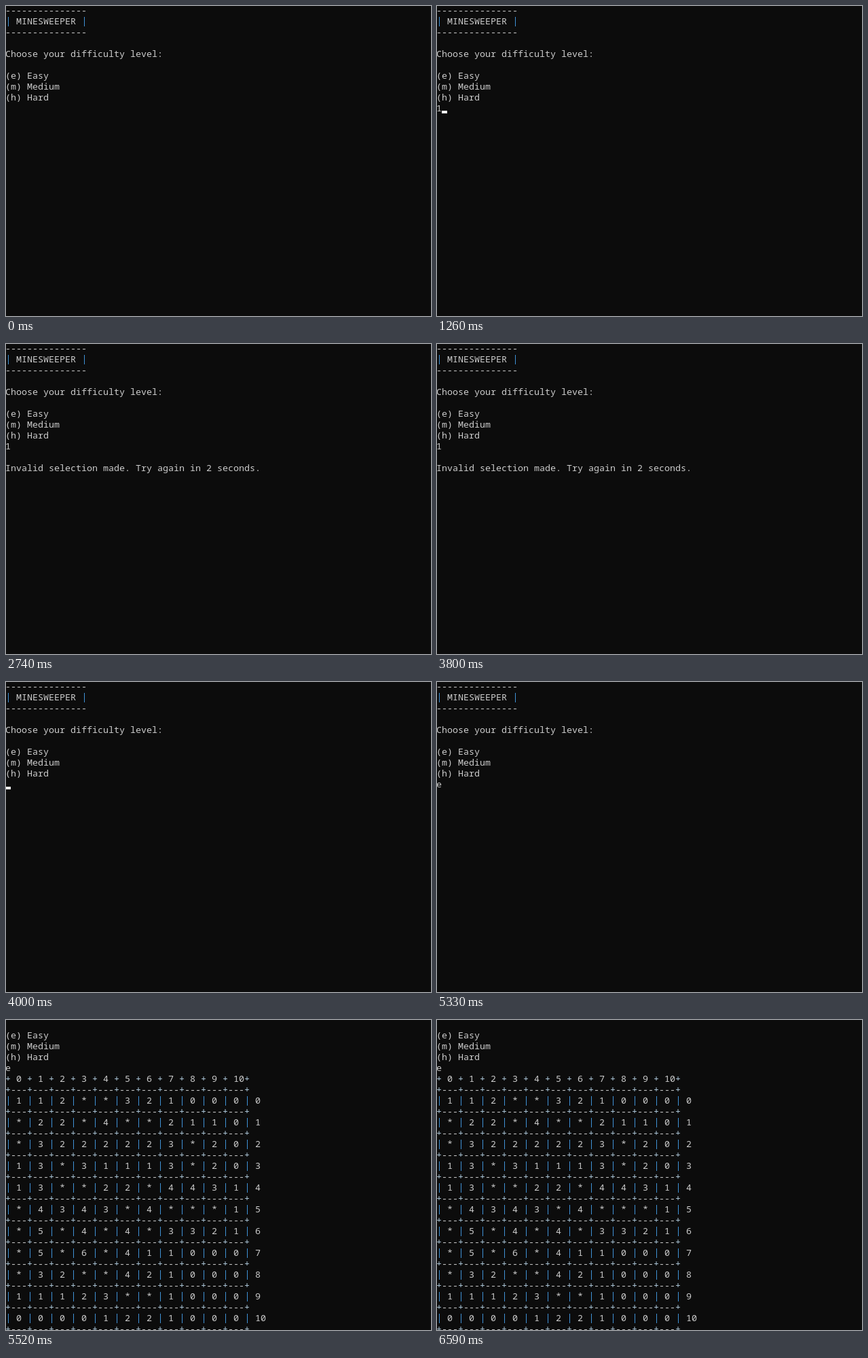
Animation of 626x456 px, one loop 7190 ms. Source, as an HTML page with a canvas:

```html
<!DOCTYPE html>
<html lang="en">
<head>
<meta charset="utf-8">
<title>Minesweeper console</title>
<style>
  html, body { margin: 0; height: 100%; overflow: hidden; background: #0c0c0c; }
  canvas { display: block; }
</style>
</head>
<body>
<canvas id="screen" width="626" height="456"></canvas>
<script>
const ctx = document.getElementById('screen').getContext('2d');
const LOOP = 7190, CELL_W = 8, CELL_H = 16;

const levels = ['(e) Easy', '(m) Medium', '(h) Hard'];
const rule = '-'.repeat(15);
const menu = [rule, '| MINESWEEPER |', rule, '', 'Choose your difficulty level:', '', ...levels];
const failed = [...menu, '1', '', 'Invalid selection made. Try again in 2 seconds.'];
const chosen = ['', ...levels, 'e'];

const field = [
  '112**321000', '*22*4**2110', '*3222223*20', '13*31113*20',
  '13**22*4431', '*4343*4***1', '*5*4*4*3321', '*5*6*411000',
  '*32**421000', '11123**1000', '00001221000'
];
const divider = '+---'.repeat(11) + '+';
const header = [...field.keys()].map(n => '+ ' + String(n).padEnd(2)).join('') + '+';
const board = [header, divider];
field.forEach((cells, n) => {
  board.push([...cells].map(c => `| ${c} `).join('') + '| ' + n, divider);
});

// Each state: start time, lines, cursor [column, row] or nothing
const states = [
  [0, menu],
  [1130, menu, [0, 9]],
  [1260, [...menu, '1'], [1, 9]],
  [1660, [...menu, '1']],
  [1860, [...menu, '1'], [0, 10]],
  [1920, failed, [0, 12]],
  [2740, failed],
  [3270, failed, [0, 12]],
  [3800, failed],
  [3930, []],
  [4000, menu, [0, 9]],
  [4800, [...menu, 'e'], [1, 9]],
  [5330, [...menu, 'e']],
  [5460, chosen],
  [5520, [...chosen, ...board]]
];

function drawChar(char, col, row) {
  const x = col * CELL_W - 1, y = row * CELL_H - 1;
  if (char === '|') {
    ctx.fillStyle = '#3f92d6';
    ctx.fillRect(x + 4, y + 1, 1, 14);
  } else if (char !== ' ') {
    ctx.fillStyle = char === '+' ? '#b4cfe2' : '#cccccc';
    ctx.fillText(char, x, y + 12);
  }
}

function draw(time) {
  const [, lines, cursor] = states.findLast(s => s[0] <= time);
  ctx.fillStyle = '#0c0c0c';
  ctx.fillRect(0, 0, 626, 456);
  ctx.font = '13.333px "Noto Sans Mono", monospace';
  lines.forEach((line, row) => [...line].forEach((char, col) => drawChar(char, col, row)));
  if (cursor) {
    ctx.fillStyle = '#f2f2f2';
    ctx.fillRect(cursor[0] * CELL_W - 1, cursor[1] * CELL_H + 10, CELL_W, 4);
  }
}

const start = performance.now();
function tick() {
  draw((performance.now() - start) % LOOP);
  requestAnimationFrame(tick);
}
tick();
</script>
</body>
</html>
```
